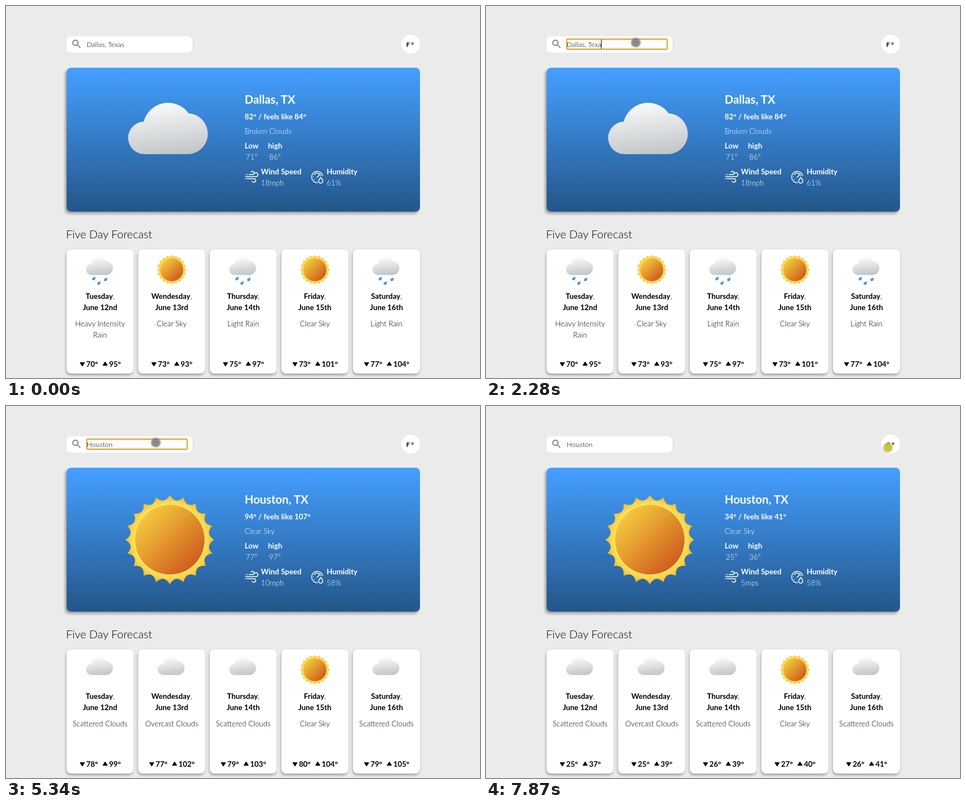
Write an HTML page that moves like this. It is 845 px wide and 663 px high and loops after 8000 ms.

```html
<!DOCTYPE html>
<html lang="en">
<head>
<meta charset="utf-8">
<title>Weather dashboard</title>
<style>
  html, body { margin: 0; width: 100%; height: 100%; overflow: hidden; background: #ebebeb; }
  svg { display: block; }
  text { font: 300 13.33px Lato, "Noto Sans", sans-serif; white-space: pre; }
  .b { font-weight: 700; }
  .mid { text-anchor: middle; }
  .city { font-size: 20.4px; font-weight: 700; }
  .title { font-size: 20px; }
  .query { font-size: 12.4px; }
  .unit { font-size: 11.1px; font-weight: 700; }
  .panel { filter: drop-shadow(-3px 4px 2px rgba(0,0,0,.3)); }
  .card { fill: #fff; filter: drop-shadow(-1px 3px 2px rgba(0,0,0,.3)); }
  .line { fill: none; stroke: #fff; stroke-width: 1.5; stroke-linecap: round; }
</style>
</head>
<body>
<svg id="stage" width="845" height="663" viewBox="0 0 845 663">
  <defs>
    <linearGradient id="sky" x2="0" y2="1">
      <stop stop-color="#44a0ff"/><stop offset="1" stop-color="#24568a"/>
    </linearGradient>
    <linearGradient id="grey" x1=".4" y1="0" x2=".6" y2="1">
      <stop stop-color="#fafafa"/><stop offset="1" stop-color="#c2c6c9"/>
    </linearGradient>
    <linearGradient id="disc" x1=".15" y1=".15" x2=".85" y2=".85">
      <stop stop-color="#f3c83d"/><stop offset="1" stop-color="#d05d1e"/>
    </linearGradient>
    <radialGradient id="rays" gradientUnits="userSpaceOnUse" cx="0" cy="0" r="79.5">
      <stop offset=".78" stop-color="#ffe75e"/><stop offset="1" stop-color="#f5b52f"/>
    </radialGradient>
    <path id="cloud" fill="url(#grey)" d="M-44 45.5A29 29 0 0 1-46.500-12.500A45 45 0 0 1 33.500-27.300A36.600 36.600 0 0 1 36 45.500Z"/>
    <g id="sun"><path id="scallop" fill="url(#rays)"/><circle r="62" fill="url(#disc)"/></g>
    <path id="drop" fill="#4a9ade" d="M3.300-3.500C3.500.500 2.300 2.900 0 2.900C-2.200 2.900-3.300 1-2.500-.600C-1.800-2 .5-2.200 3.300-3.500Z"/>
  </defs>

  <rect x="108" y="54" width="224" height="29" rx="8" fill="#fff"/>
  <path id="lens" fill="#7b7b7b" transform="translate(115.500 57.400) scale(.857)" d="M15.500 14h-.79l-.28-.27C15.410 12.590 16 11.110 16 9.500 16 5.910 13.090 3 9.500 3S3 5.910 3 9.500 5.910 16 9.500 16c1.610 0 3.090-.59 4.230-1.570l.27.28v.79l5 4.990L20.490 19l-4.990-5zm-6 0C7.010 14 5 11.990 5 9.500S7.010 5 9.500 5 14 7.010 14 9.500 11.990 14 9.500 14z"/>
  <path id="spinner" fill="none" stroke="#666" d="M8-2A8.200 8.200 0 0 1-5.800 5.800"/>
  <rect id="focus" x="144" y="59" width="179" height="18" rx="2" fill="none" stroke="#e39b24" stroke-width="2"/>
  <text id="query" class="query" x="144" y="73"></text>
  <rect id="caret" y="60" width="1" height="16"/>

  <circle cx="721.500" cy="68" r="16.700" fill="#fff"/>
  <text id="unit" class="unit" x="713.500" y="73"></text>

  <rect class="panel" x="108" y="110" width="630" height="256.500" rx="8" fill="url(#sky)"/>
  <text class="title" x="107" y="414">Five Day Forecast</text>
  <g id="cards"></g>
  <g id="scenes"></g>

  <g id="dot"><circle r="9.500" fill-opacity=".45"/><circle r="7.500" fill-opacity=".85"/></g>
  <path id="mover" stroke="#fff" stroke-width=".6" d="M0-7l3 3.200H1V-1h2.800V-3L7 0 3.800 3V1H1v2.800h2L0 7-3 3.800h2V1h-2.800v2L-7 0l3.200-3v2H-1v-2.800h-2z"/>
</svg>

<script>
const LOOP = 8000;
const $ = id => document.getElementById(id);
const show = (el, on) => { el.style.display = on ? "" : "none"; };
const text = (x, y, s, cls = "") => `<text class="${cls}" x="${x}" y="${y}">${s}</text>`;
const use = (id, x, y, scale = 1) =>
  `<use href="#${id}" transform="translate(${x} ${y}) scale(${scale})"/>`;

// Sun edge: twenty points joined by hollow curves.
const polar = (r, k) => {
  const a = (k * 18 - 90) * Math.PI / 180;
  return `${(r * Math.cos(a)).toFixed(2)} ${(r * Math.sin(a)).toFixed(2)}`;
};
let edge = "M" + polar(79.5, 0);
for (let k = 0; k < 20; k++) edge += `Q${polar(63, k + .5)} ${polar(79.5, k + 1)}`;
$("scallop").setAttribute("d", edge + "Z");

const days = ["Tuesday", "Wendesday", "Thursday", "Friday", "Saturday"];
const dates = ["12nd", "13rd", "14th", "15th", "16th"];
const cardX = i => 108 + i * 127.65;
const midX = i => cardX(i) + 59.7;

$("cards").innerHTML = days.map((day, i) =>
  `<rect class="card" x="${cardX(i)}" y="434" width="119.300" height="221" rx="8"/>` +
  text(midX(i), 522, `<tspan class="b">${day}</tspan>,`, "mid") +
  text(midX(i), 542, "June " + dates[i], "mid b")).join("");

const icons = {
  sun: x => use("sun", x, 470, 1 / 3),
  cloud: x => use("cloud", x, 464, .338),
  rain: x => icons.cloud(x) + use("drop", x - 11.5, 486) +
    use("drop", x + 9.5, 487.5) + use("drop", x - 2.5, 494)
};

function temps(cx, low, high) {
  const width = v => String(v).length * 7.73 + 5.2;
  const left = cx - (32 + width(low) + width(high)) / 2;
  const right = left + 20 + width(low);
  const tri = (x, y, flip) =>
    `<path transform="translate(${x + 5} ${y}) scale(1 ${flip})" stroke="#000" stroke-linejoin="round" d="M-4 3L0-3.500L4 3Z"/>`;
  return tri(left, 638.5, -1) + text(left + 12, 643, low + "°", "b") +
    tri(right, 637.5, 1) + text(right + 12, 643, high + "°", "b");
}

const windIcon = `<g class="line">
  <path d="M433 300.500H439.500A3 3 0 1 0 436.800 296"/>
  <path d="M427 304.200H445.500A3.600 3.600 0 1 0 442 299.500"/>
  <path d="M429 307.800H442A3.200 3.200 0 1 1 439 312.200"/>
  <path d="M426.500 307.800h.1M428 300.500h2"/></g>`;
const humidIcon = `<g class="line">
  <path d="M564.400 302A10 10 0 1 0 555.500 314.800"/>
  <path d="M561 302A6.700 6.700 0 0 0 549.500 300.500M548 304.500h.1M549.500 309h.1M554.500 305.500L559 300.500"/>
  <path d="M561 305.500C559 308.500 557.300 309.800 557.300 312A3.700 3.700 0 0 0 564.700 312C564.700 309.800 563 308.500 561 305.500Z"/></g>`;

function scene(s) {
  const art = s.art === "sun" ? use("sun", 292, 238.3) : use("cloud", 292, 218.5);
  const x = 425.5;
  const now = art + `<g fill="#fff">` +
    text(x, 173.5, s.city + ", TX", "city") +
    text(x, 201.5, `${s.now}° / feels like ${s.feels}°`, "b") +
    text(x, 227.5, s.sky) +
    text(x, 254, "Low", "b") + text(467, 254, "high", "b") +
    text(438, 273.5, s.low + "°", "mid") + text(479.5, 273.5, s.high + "°", "mid") +
    text(454.5, 299.5, "Wind Speed", "b") + text(454.5, 319.5, s.wind) +
    text(571.5, 299.5, "Humidity", "b") + text(571.5, 319.5, s.humid + "%") +
    "</g>" + windIcon + humidIcon;
  const week = s.week.map(([icon, sky, low, high], i) =>
    icons[icon](midX(i)) +
    sky.split("|").map((line, k) => text(midX(i), 570.5 + 20 * k, line, "mid")).join("") +
    temps(midX(i), low, high)).join("");
  return `<g>${now}${week}</g>`;
}

const dallas = {
  city: "Dallas", art: "cloud", now: 82, feels: 84, sky: "Broken Clouds",
  low: 71, high: 86, wind: "18mph", humid: 61,
  week: [["rain", "Heavy Intensity|Rain", 70, 95], ["sun", "Clear Sky", 73, 93],
    ["rain", "Light Rain", 75, 97], ["sun", "Clear Sky", 73, 101], ["rain", "Light Rain", 77, 104]]
};
const houston = {
  city: "Houston", art: "sun", now: 94, feels: 107, sky: "Clear Sky",
  low: 77, high: 97, wind: "10mph", humid: 58,
  week: [["cloud", "Scattered Clouds", 78, 99], ["cloud", "Overcast Clouds", 77, 102],
    ["cloud", "Scattered Clouds", 79, 103], ["sun", "Clear Sky", 80, 104],
    ["cloud", "Scattered Clouds", 79, 105]]
};
const celsius = v => Math.round((v - 32) / 1.8);
const metric = {
  ...houston, now: 34, feels: 41, low: 25, high: 36, wind: "5mps",
  week: houston.week.map(([icon, sky, low, high], i) =>
    [icon, sky, i ? celsius(low) : 25, celsius(high)])
};
$("scenes").innerHTML = [dallas, houston, metric].map(scene).join("");
const scenes = [...$("scenes").children];

// Step tables: each row holds from its time until the next one.
const FIRST = "Dallas, Texas", SECOND = "Houston";
const typing = [[0, FIRST]];
[[2280, 12], [2820, 11], [2895, 10], [2970, 8], [3050, 7], [3125, 5], [3200, 4], [3275, 2], [3350, 1]]
  .forEach(([t, n]) => typing.push([t, FIRST.slice(0, n)]));
[[3620, 0], [3880, 1], [4010, 2], [4145, 3], [4210, 4], [4410, 6], [4560, 7]]
  .forEach(([t, n]) => typing.push([t, SECOND.slice(0, n)]));

const caret = [[0, 0], [1480, 1], [1950, 0], [2280, 1], [5010, 0], [5540, 1], [6010, 0], [6550, 1], [7010, 0]];
const data = [[0, 0], [5340, 1], [7075, 2]];
const look = [[0, ""], [330, "grey"], [1150, "yellow"], [1280, "grey"], [3750, "move"], [4010, "grey"],
  [6810, "yellow"], [7075, "grey"], [7870, "yellow"]];

const path = [];
function travel(start, gap, points) {
  points.forEach((p, i) => path.push([start + i * gap, p]));
}
travel(0, 1, [[627, 466]]);
travel(330, 70, [[627, 466], [540, 385], [400, 260], [255, 135], [165, 74], [140, 58], [205, 66], [271, 76]]);
travel(1020, 65, [[268, 72], [263, 67], [263, 67], [263, 67], [267, 65]]);
travel(6010, 67.5, [[400, 75], [610, 120], [743, 156], [743, 147], [739, 128], [733, 106], [726, 84], [719, 64], [716.5, 74]]);

const at = (rows, t) => rows.filter(r => r[0] <= t).pop()[1];

function draw(t) {
  const focused = t >= 1480 && t < 7010;
  const loading = t >= 4880 && t < 5340;
  const current = at(data, t);
  scenes.forEach((g, i) => show(g, i === current));

  $("query").textContent = at(typing, t);
  show($("focus"), focused);
  show($("caret"), at(caret, t));
  $("caret").setAttribute("x", Math.round(143.5 + $("query").getComputedTextLength()));
  $("unit").textContent = current === 2 ? "C °" : "F °";

  show($("lens"), !loading);
  show($("spinner"), loading);
  const turn = Math.floor((t - 4880) / 66) * 24 - 120;
  $("spinner").setAttribute("transform", `translate(127 69) rotate(${turn})`);

  const kind = at(look, t), [x, y] = at(path, t);
  for (const id of ["dot", "mover"]) $(id).setAttribute("transform", `translate(${x} ${y})`);
  show($("dot"), kind === "grey" || kind === "yellow");
  show($("mover"), kind === "move");
  $("dot").setAttribute("fill", kind === "yellow" ? "#c4c232" : "#808080");
}

const start = performance.now();
function tick() {
  draw((performance.now() - start) % LOOP);
  requestAnimationFrame(tick);
}
tick();
</script>
</body>
</html>
```
